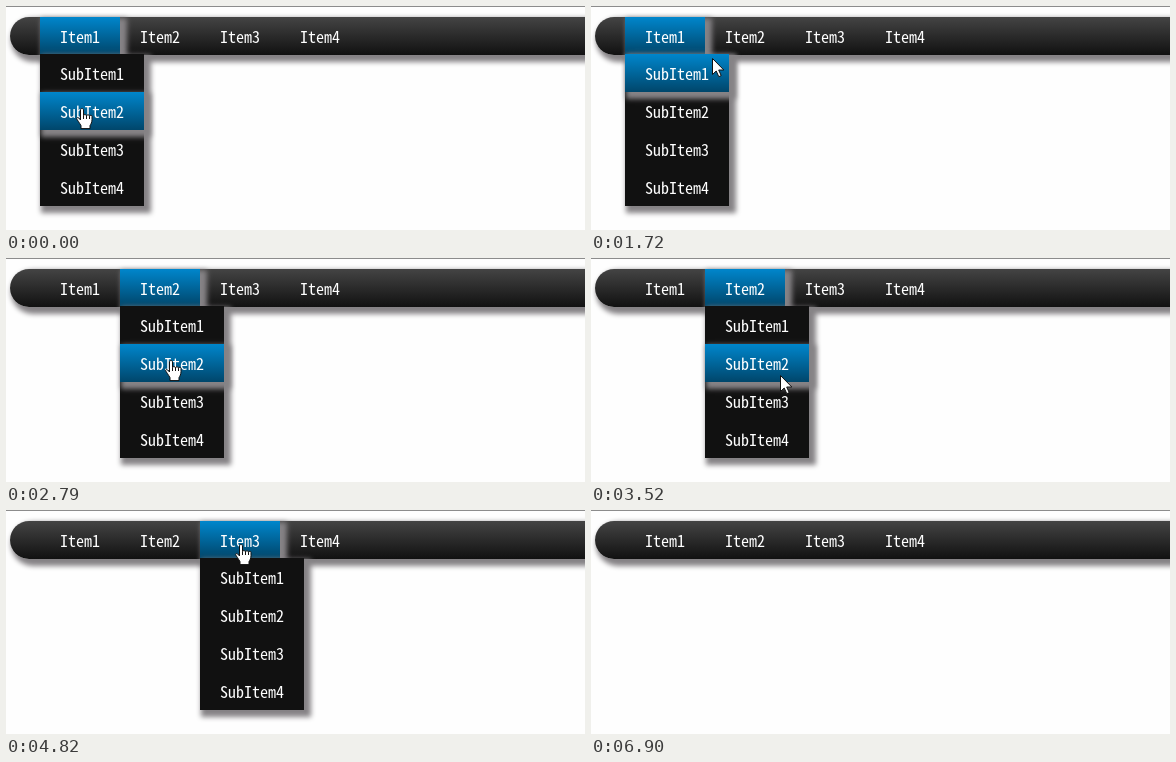
An HTML page for the animation above (7420 ms loop, 579x224 px).

```html
<!DOCTYPE html>
<html lang="en">
<head>
<meta charset="utf-8">
<title>Drop-down menu</title>
<style>
html, body { margin: 0; width: 100%; height: 100%; overflow: hidden; background: #fefefe; }
body { position: relative; font: 16px/38px "Noto Sans Mono CJK SC", "Noto Sans Mono CJK JP", "Liberation Mono", monospace; color: #fff; }
ul { margin: 0; padding: 0; list-style: none; }
#rule { position: absolute; width: 100%; height: 1px; background: #8c8c8c; }
#bar, #drop, .on { box-shadow: 4px 4px 5px 3px #868386; }
#bar { position: absolute; left: 4px; top: 11px; width: 640px; height: 38px; border-radius: 19px; background: linear-gradient(#444, #111); }
#items { position: absolute; left: 34px; top: 11px; display: flex; }
#items li { width: 60px; height: 37px; padding-left: 20px; }
#drop { position: absolute; top: 48px; width: 104px; background: #111; }
#drop li { height: 38px; padding-left: 20px; }
.on { background: linear-gradient(#0086cc, #00466b); }
svg { position: absolute; left: 0; top: 0; }
</style>
</head>
<body>
<div id="rule"></div>
<div id="bar"></div>
<ul id="items"><li>Item1</li><li>Item2</li><li>Item3</li><li>Item4</li></ul>
<ul id="drop"><li>SubItem1</li><li>SubItem2</li><li>SubItem3</li><li>SubItem4</li></ul>
<svg width="579" height="224" fill="#fff" stroke="#111" stroke-linejoin="round">
  <path id="arrow" d="M.5 .5V16.5L4.2 13 6.8 18.7 9.2 17.6 6.7 12H11.8Z"/>
  <g id="hand">
    <path d="M5.5 1.5c-1 0-1.5.7-1.5 1.5v10l-1.8-2c-.8-.8-2-.6-2 .6 0 .8 3 4.5 4.3 7v3h9v-3c1-1.5 2-3.5 2-6V9.5c0-1.6-2-1.6-2.5-.4 0-1.6-2.6-1.8-3-.3 0-1.5-2.6-1.6-3-.3V3c0-.8-.6-1.5-1.5-1.5z"/>
    <path d="M7 8.5V12M10 8.8V12M13 9.1V12" fill="none"/>
  </g>
</svg>
<script>
const BEAT = 140, BEATS = 53, GONE = 49;
const LEFT = 34, TOP = 48, ITEM = 80, DROP = 104, ROW = 38;
const $ = id => document.getElementById(id);
const items = [...$('items').children], subs = [...$('drop').children];

// Pointer path: beat, x, y
const path = [[0, 76, 103], [5, 88, 180], [8, 93, 142], [12, 121, 54], [15, 152, 33], [19, 165, 103],
  [22, 174, 143], [29, 210, 86], [32, 216, 34], [33, 216, 34], [37, 292, 36], [39, 292, 36],
  [40, 293, 59], [47, 546, 204], [GONE, 578, 224]];

function pointer(beat) {
  const i = Math.max(1, path.findIndex(p => p[0] >= beat));
  const [a, x, y] = path[i - 1], [b, u, v] = path[i];
  const k = (beat - a) / (b - a);
  return [Math.round(x + (u - x) * k), Math.round(y + (v - y) * k)];
}

// The bar opens a menu; it stays open while the pointer is inside it
function nextMenu(menu, x, y) {
  if (y < TOP) return Math.floor((x - LEFT) / ITEM);
  const dx = x - LEFT - ITEM * menu;
  return menu >= 0 && dx >= 0 && dx < DROP && y < TOP + ROW * subs.length ? menu : -1;
}

const states = [];
for (let beat = 0, menu = 0; beat < GONE; beat++) {
  const [x, y] = pointer(beat);
  menu = nextMenu(menu, x, y);
  const sub = menu >= 0 && y >= TOP ? Math.floor((y - TOP) / ROW) : -1;
  // Only the label itself is a link
  const dx = x - LEFT - 20 - ITEM * menu, dy = y - TOP - ROW * (sub + 0.5);
  const link = menu >= 0 && dx >= 0 && dx < (sub < 0 ? 40 : 64) && Math.abs(dy) < 9;
  states.push({ x, y, menu, sub, link });
}
const idle = { x: 0, y: 0, menu: -1, sub: -1, link: false };

function place(id, show, x, y) {
  $(id).style.display = show ? '' : 'none';
  $(id).setAttribute('transform', `translate(${x} ${y})`);
}

function draw(now) {
  const state = states[Math.floor(now / BEAT) % BEATS] || idle;
  const { x, y, menu, sub, link } = state;
  items.forEach((el, i) => el.classList.toggle('on', i === menu));
  subs.forEach((el, i) => el.classList.toggle('on', i === sub));
  $('drop').style.display = menu < 0 ? 'none' : '';
  $('drop').style.left = LEFT + ITEM * menu + 'px';
  place('hand', link, x - 5.5, y - 2);
  place('arrow', !link && state !== idle, x, y - 2);
  requestAnimationFrame(() => draw(performance.now() - start));
}
const start = performance.now();
draw(0);
</script>
</body>
</html>
```
